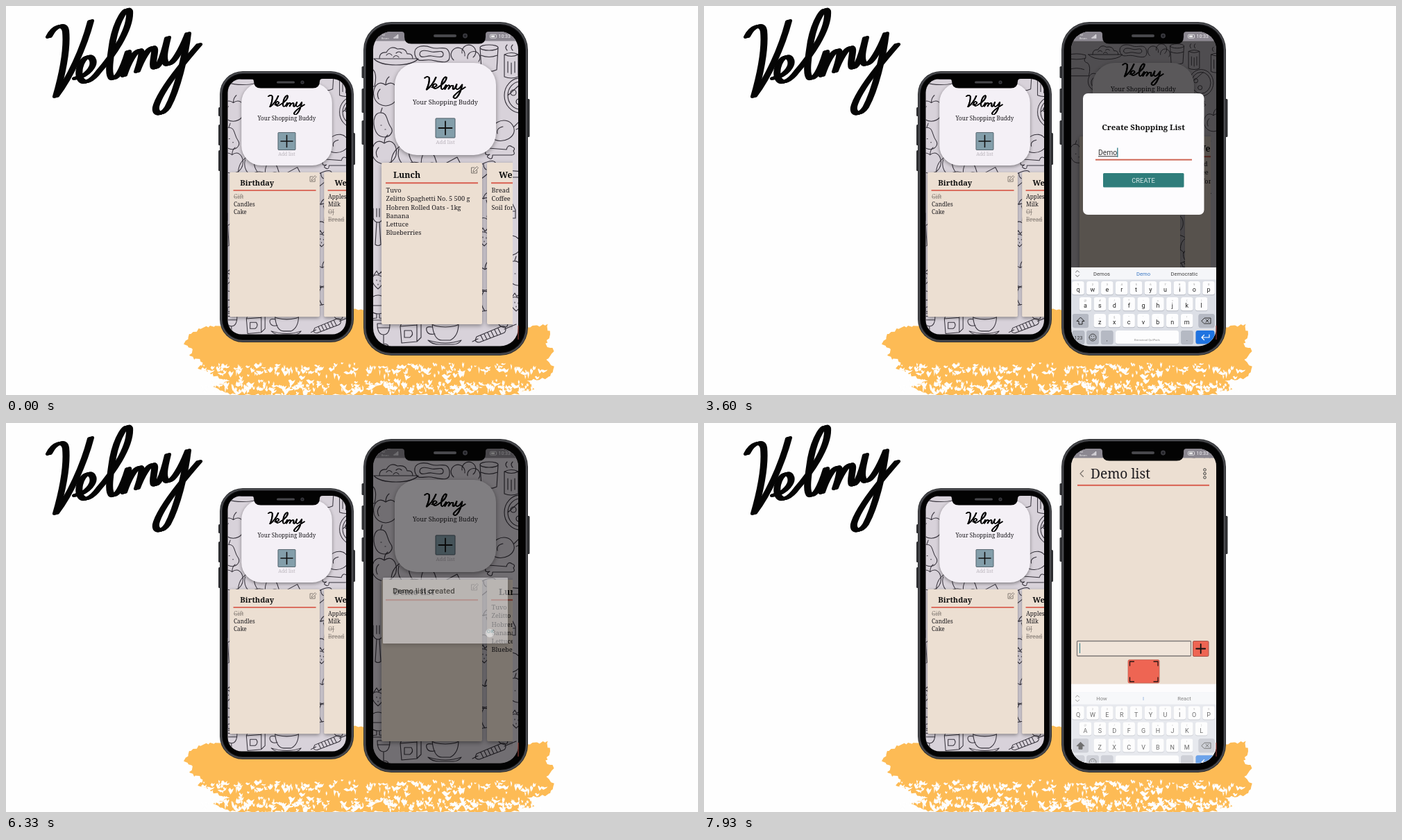
An HTML page that plays this animation: 997x561 px, repeating every 8000 ms.

```html
<!DOCTYPE html>
<html lang="en">
<head>
<meta charset="utf-8">
<title>Velmy</title>
<style>
html, body { margin: 0; width: 100%; height: 100%; overflow: hidden; background: #fefefe; }
svg { display: block; width: 100%; height: 100%; }
text { white-space: pre; }
.serif { font-family: "Noto Serif", serif; }
.sans { font-family: Roboto, sans-serif; }
.mid { text-anchor: middle; }
.line { fill: none; stroke-linecap: round; stroke-linejoin: round; }
.lift { filter: drop-shadow(0 2px 3px rgba(0,0,0,.4)); }
</style>
</head>
<body>
<svg id="stage" viewBox="0 0 997 561" preserveAspectRatio="none"></svg>
<script>
const CREAM = '#ecdfd2', RED = '#d95f50', INK = '#1c1a1e', LOOP = 8000;
const $ = id => document.getElementById(id);

let seed = 11;
const rnd = () => (seed = seed * 16807 % 2147483647) / 2147483647;

const rect = (x, y, w, h, fill, r = 0, more = '') =>
  `<rect x="${x}" y="${y}" width="${w}" height="${h}" rx="${r}" fill="${fill}" ${more}/>`;
const text = (x, y, size, str, cls = 'serif', fill = INK, more = '') =>
  `<text x="${x}" y="${y}" font-size="${size}" class="${cls}" fill="${fill}" ${more}>${str}</text>`;
const line = (d, stroke, w = 1, more = '') =>
  `<path class="line" d="${d}" stroke="${stroke}" stroke-width="${w}" ${more}/>`;
const group = (id, inner, more = '') => `<g id="${id}" ${more}>${inner}</g>`;

// Script wordmark, drawn with a slanted nib
const WORD = 'M62 44C70 28 84 24 86 36C89 66 80 102 72 130C92 104 112 60 122 22' +
  'M100 104C116 102 130 86 124 76C116 66 102 86 106 102C110 116 124 108 134 94' +
  'C150 76 180 36 178 8C174 -2 160 20 154 50C150 76 146 100 153 104C160 106 168 92 176 66' +
  'C178 76 174 88 170 100C176 82 186 64 193 64C198 66 193 82 189 94C195 78 205 60 212 60' +
  'C218 62 209 82 213 88C218 92 225 80 233 46C229 62 224 82 233 84C242 84 255 58 262 40' +
  'C258 74 247 120 233 146C224 160 212 156 217 142C224 122 250 88 278 56';
const wordmark = (w, spread) => [-2, -1, 0, 1, 2].map(i =>
  line(WORD, '#050505', w, `transform="translate(${i * spread} ${-i * spread * .25})"`)).join('');

const DOODLES = {
  plate: 'M-32 4H32Q24 13 0 13T-32 4M-24 4Q-24-6-14-5Q-8-16 2-10Q14-12 16-3Q24-4 24 4M-14-1q4-5 8 0M0-4q4-4 8 0M-4 2q4-5 8 0',
  steak: 'M-24 0C-26-14-10-14 0-10S24-16 26 0S12 10 0 8S-20 14-24 0M-17 0c0-8 10-6 17-4s16-4 17 3s-10 4-17 3s-15 5-17-2',
  eggs: 'M-18 8a10 10 0 1 1 16-6M-6-2a10 10 0 1 1 16 6M2 6a9 9 0 1 1 16 4',
  glass: 'M-13-14l2 32q11 5 22 0l2-32M-13-14a13 4 0 1 0 26 0a13 4 0 1 0-26 0M-12-3q12 5 24 0',
  mug: 'M-10-8q10 5 20 0v32q-10 4-20 0zM-10-8q10-5 20 0M-6-14q-4-4 0-8M2-14q-4-4 0-8M-5 2v16M0 4v16M5 2v16',
  pizza: 'M-23 0a23 25 0 1 0 46 0a23 25 0 1 0-46 0M-18 0a18 20 0 1 0 36 0a18 20 0 1 0-36 0M-14-4a4 4 0 1 0 8 0a4 4 0 1 0-8 0M-6 9a4 4 0 1 0 8 0a4 4 0 1 0-8 0M-18 0L4-20',
  apple: 'M0-10C-18-24-28 18 0 20C28 18 18-24 0-10q0-8 5-12M-8-4q-6 6-2 14',
  pear: 'M-4-16C8-18 6-4 12 4s-2 18-14 14S-16-14-4-16M-2-17l2-6M-2 2h1M4 8h1',
  leg: 'M-18 10C-26-10 2-24 12-8S-4 22-18 10M14-6l10-10q8-4 4 4q8 2-2 6l-9 4M-10 4q-2-8 8-10',
  bone: 'M-12 4q-8 2-6-4q-4-6 4-5L12-3q2-8 8-4q6 2 2 6q4 6-4 6L-8 5q0 8-6 4q-4-2 2-5z',
  roll: 'M-30 6C-36-18-10-36 10-26C30-22 40 0 32 22C24 26 16 20 18 6C8-4-6-2-10 6C-18 14-26 14-30 6zM-10 6Q-24-4-20-20M0 0Q-10-14-2-28M12 2Q12-14 22-20M18 8Q24-4 34 2',
  melon: 'M-20-12Q-2-17 20-13Q22 10 4 17T-20-12zM-16-8Q0-12 16-9Q16 8 3 12T-16-8M-8-3v3M0-4v3M8-3v3M-3 3v3M5 3v3',
  sundae: 'M-31 4Q-20 0-10 3T12 3T31 3Q26 28 0 28T-31 4M-24 0C-28-16-10-18-8-6C-2-24 20-14 22 1M-8-6q-2 10 3 9q4-1 4-7q5 12 9 3q3-8 8-2M-6-16q-10-6-2-11q0-10 9-10q10 0 8 9q10 4 2 11q-8 4-17 1M0-36l4-5M-20 14Q0 22 20 14',
  bread: 'M-22 18Q-32 10 4-14Q24-24 24-12Q-2 16-22 18M-10 10q-4-2-4-8M0 3q-4-3-4-8M10-6q-4-2-4-8',
  cheese: 'M-16 4L10-10L16 2V14H-16zM-16 4H16M-6 9a3 3 0 1 0 1 0M7 8a2 2 0 1 0 1 0',
  egg: 'M-12 0C-14-20 14-20 12 0zM-13 0q2 12 13 12t13-12zM-2 12v6q-6 0-8 3h20q-2-3-8-3v-6',
  jar: 'M-17-13q17-5 34 0v6q-17 4-34 0zM-15-6q2 6-6 8q-6 6-2 24h46q4-18-2-24q-8-2-6-8M-14 14q14-5 28 0',
  pepper: 'M0-10C-16-18-16 12-6 20Q0 15 6 20C17 14 15-18 0-10q0-6 6-9M-3-8q-5 12-1 24M4-8q5 12 1 24',
  fork: 'M-2 26L0-6h4l2 32q-4 3-8 0M-5-26v14q2 6 7 6t7-6v-14M0-26v12M4-26v12',
  cup: 'M-18-10a19 5 0 1 0 38 0a19 5 0 1 0-38 0M-18-10Q-16 14-4 14H8Q20 8 20-10M-18-5q-10-2-8 5t12 5M-24 14q26 8 48 0q-4 6-12 6h-20q-10 0-16-6M-6-10q6-4 14 0',
  carton: 'M-14-6l2 24l22-2v-24zM-14-6l4-9l20-1v8M10 16l6-6v-20l-6-6M-8 0h10q4 6-2 10h-8z',
  skewer: 'M-30 13L-22 9M16-5L33-12M-24 6l36-15q6-1 6 4t-4 6l-34 13q-5 0-6-3zM-18 4l4 8M-13 2l4 8M-8 0l4 8M-3-2l4 8M2-4l4 8M7-6l4 8',
  wine: 'M-9-10q0 16 9 16t9-16zM0 6v14m-7 2h14q-2-3-7-3M-9-4h18',
  berry: 'M0 12C-14 0-8-10 0-8S14 0 0 12M-6-8l4-6l3 5l4-4l1 6M-2-1v1M3 0v1M0 5v1'
};
const SPOTS = 'plate 562 72,steak 613 70,eggs 663 70,glass 696 74,mug 728 78,pizza 741 129,apple 547 124,' +
  'pear 542 170,apple 545 208,leg 718 180,bone 709 210,roll 586 226,bread 682 242,melon 574 277,sundae 633 286,' +
  'cheese 718 292,egg 575 322,jar 627 333,pepper 664 324,fork 534 318,berry 689 334,berry 536 396,pear 735 384,' +
  'apple 690 390,leg 728 346,wine 544 468,carton 582 468,cup 632 468,skewer 702 471,berry 735 428,egg 536 432,' +
  'bone 735 242,jar 508 90,mug 770 84,apple 764 200,pear 508 260,cheese 640 228,pepper 688 288,roll 690 440';
const pattern = SPOTS.split(',').map(s => {
  const [name, x, y] = s.split(' ');
  return line(DOODLES[name], '#37333c', 1.15, `transform="translate(${x} ${y})"`);
}).join('');

const plus = (cx, cy, r) => line(`M${cx - r} ${cy}H${cx + r}M${cx} ${cy - r}V${cy + r}`, '#111', 1.8);

function card(x, title, items) {
  const rows = items.map((s, i) => {
    const done = s[0] === '-';
    return text(x + 6.5, 269 + i * 12.25, 9.2, done ? s.slice(1) : s, 'serif',
      done ? '#8f867f' : INK, done ? 'text-decoration="line-through"' : '');
  }).join('');
  return rect(x, 226, 145, 233, CREAM, 2, 'class="lift"') +
    text(x + 17, 248, 12.3, title, 'serif', '#111', 'font-weight="700"') +
    line(`M${x + 6} 255.3H${x + 139}`, RED, 2, 'style="stroke-linecap:butt"') +
    line(`M${x + 134} 233h-4.5v8h8v-4M${x + 132} 239l.5-2.5l5-5l2 2l-5 5z`, '#6f6862', .9) + rows;
}

const home = (id, lists) =>
  rect(500, 30, 270, 470, '#d8d2da') + group(id + 'Bg', pattern) +
  `<rect id="${id}Panel" class="lift" x="560" y="82" width="146" height="133" rx="32" fill="#f4f0f6"/>` +
  group(id + 'Title',
    `<g transform="matrix(.27 .05 0 .19 586.5 92.5)" aria-label="Velmy">${wordmark(5, .9)}</g>` +
    text(633, 142, 9.1, 'Your Shopping Buddy', 'serif mid') +
    group(id + 'Add', rect(619, 162, 28, 28, '#839eaa', 1, 'stroke="#4d5d66" stroke-width="1"') + plus(633, 176, 9.5)) +
    text(633, 199, 7.6, 'Add list', 'serif mid', '#bab4bc')) +
  `<g clip-path="url(#listClip)">${group(id + 'Lists', lists)}</g>`;

const LUNCH = ['Tuvo', 'Zelitto Spaghetti No. 5 500 g', 'Hobren Rolled Oats - 1kg', 'Banana', 'Lettuce', 'Blueberries'];
const leftHome = home('l', card(541, 'Birthday', ['-Gift', 'Candles', 'Cake']) +
  card(693, 'Weekly', ['Apples', 'Milk', '-OJ', '-Bread']));
const rightHome = home('r',
  group('listsA', card(541, 'Lunch', LUNCH) + card(693, 'Weekly', ['Bread', 'Coffee', 'Soil for pots'])) +
  group('listsB', group('demo', card(541, 'Demo list', [])) + card(693, 'Lunch', LUNCH)));

// Keyboard
const ROWS = [['qwertyuiop', 539, 407], ['asdfghjkl', 549.5, 430], ['zxcvbnm', 570.3, 454]];
const HINTS = ['1234567890', '@#/*-+=()', '_$"\':;!'];
const STEP = 20.9;
const keySpot = ch => {
  if (ch === ' ') return [640, 478];
  const [s, x, y] = ROWS.find(r => r[0].includes(ch));
  return [x + s.indexOf(ch) * STEP, y];
};
const keyRect = (cx, cy, w, fill) => rect(cx - w / 2, cy - 9.7, w, 20, '#b4b8c1', 3) + rect(cx - w / 2, cy - 10, w, 19.3, fill, 3);

function keyboard() {
  let s = rect(529, 377, 209, 125, '#dcdfe6') + rect(529, 377, 209, 17.5, '#f5f6f9') +
    line('M535.5 384l2.5-2.5l2.5 2.5M535.5 388l2.5 2.5l2.5-2.5', '#666', 1);
  [573, 633, 692].forEach((x, i) => s += text(x, 388.5, 7.6, '', 'sans mid', i === 1 ? '#3b78c4' : '#444', `id="hint${i}"`));
  ROWS.forEach(([letters, , y], row) => [...letters].forEach((ch, i) => {
    const [x] = keySpot(ch);
    s += keyRect(x, y, 17.5, '#fdfdfe') + text(x, y - 4, 4.3, HINTS[row][i], 'sans mid', '#999') +
      text(x, y + 5.3, 9, ch, 'sans mid key', '#222');
  }));
  const dark = '#b5b9c3';
  return s + keyRect(542.5, 454, 23, dark) + keyRect(724, 454, 23, dark) +
    `<path id="shift" d="M542.5 449l5.5 5.5h-3v4.5h-5v-4.5h-3z" stroke="#222" stroke-linejoin="round"/>` +
    line('M717 454l4-4h9v8h-9zM723 452l4 4M727 452l-4 4', '#333', 1) +
    keyRect(539.5, 478, 17.5, dark) + text(539.5, 481, 7, '123', 'sans mid', '#333') +
    keyRect(560, 478, 17.5, dark) + line('M555 478a5 5 0 1 0 10 0a5 5 0 1 0-10 0M557.5 479.5q2.5 3 5 0M558.3 476v.5M561.7 476v.5', '#333', .9) +
    keyRect(580.7, 478, 17.5, dark) + text(580.7, 483, 7, ',', 'sans mid', '#333') +
    keyRect(638.5, 478, 91, '#fdfdfe') + text(638.5, 482.5, 4.2, 'Brimstead QuilPads', 'sans mid', '#888') +
    keyRect(696, 478, 17.5, dark) + text(696, 483, 7, '.', 'sans mid', '#333') +
    keyRect(722, 478, 27, '#1f73e0') + line('M728 474v4h-11m3.5-3.5l-3.5 3.5l3.5 3.5', '#fff', 1.2) +
    group('pop', rect(-11, -33, 22, 43, '#fcfcfe', 4, 'class="lift"') + text(0, -16, 11, '', 'sans mid', '#3b6fa5', 'id="popKey"'));
}

const dialog = rect(546, 126, 174.5, 175, '#fdfcfe', 7) +
  text(633, 179, 11.4, 'Create Shopping List', 'serif mid', '#111', 'font-weight="700"') +
  text(568, 215.3, 10.3, 'Insert list name...', 'sans', '#a5a3a6', 'id="blank"') +
  `<text id="typed" class="sans" x="568" y="215.3" font-size="10.3" fill="#333"><tspan id="done"></tspan><tspan id="word" text-decoration="underline"></tspan></text>` +
  rect(568, 204.5, 1.3, 13.5, '#2c7a86', 0, 'id="caret"') + rect(564, 220.7, 139, 2, '#cf6857') +
  group('create', rect(575, 241, 116.5, 20.5, '#2f7d7b', 1.5) + text(633, 254.7, 9.3, 'CREATE', 'sans mid', '#dcebea'));

const alertBox = rect(543, 223, 180, 95, '#fcfafc', 1, 'class="lift"') +
  text(557, 246, 11.4, 'Demo list created', 'sans', '#222', 'font-weight="500"') +
  text(698, 303, 7.8, 'OK', 'sans mid', '#1c6f7d', 'font-weight="700"');

const page = rect(529, 30, 209, 500, CREAM) +
  line('M546.5 68.5l-4.5 4.5l4.5 4.5', '#77706a', 1.1) + text(557, 80, 19.2, 'Demo list') +
  [67.5, 73, 78.5].map(y => `<circle cx="721.5" cy="${y}" r="1.8" fill="none" stroke="#333"/>`).join('') +
  rect(538, 88.8, 190, 2, RED) +
  group('entry', rect(537.5, 314.5, 164, 21.5, '#f0e4d9', 1, 'stroke="#7f7a78" stroke-width="1.3"') +
    rect(541, 317.5, 1, 14.5, '#2c7a86', 0, 'id="entryCaret"') +
    rect(704.5, 314.5, 22.5, 22, '#ee6553', 1.5, 'stroke="#a5544a" stroke-width="1"') + plus(715.7, 325.5, 6.5) +
    rect(611, 341.5, 45, 33.5, '#ee6553', 2, 'stroke="#c06055" stroke-width=".8"') +
    line('M613.5 350v-6h6M648 344h6v6M654 367v6h-6M619.5 373h-6v-6', '#2a1715', 1.3)) +
  rect(529, 376.5, 209, 130, '#fdfcfd', 0, 'id="under"');

const status = rect(529, 30, 209, 20.5, '#8b8790') + text(541, 43, 3.8, 'Tel', 'sans', '#eee') +
  text(541, 47.8, 3.8, 'Bovan', 'sans', '#eee') +
  [0, 1, 2, 3].map(i => rect(558.5 + i * 1.8, 45.2 - i * 1.4, 1.2, 1.6 + i * 1.4, '#f2f0f4')).join('') +
  rect(697.5, 41.2, 9, 5, 'none', 1, 'stroke="#eee" stroke-width=".8"') + rect(699, 42.5, 5, 2.4, '#eee') +
  text(709.5, 46.4, 7, '10:33', 'sans', '#f4f2f5');

// Orange paint: a solid stroke, then dry bristles below it
function paint() {
  const top = [[258, 488], [264, 474], [285, 463], [325, 460], [380, 450], [500, 437], [535, 441], [700, 452], [752, 462], [780, 460], [784, 474], [777, 488], [790, 496], [780, 510], [790, 524], [781, 536], [752, 541]];
  const low = [[760, 552], [736, 561], [318, 561], [298, 548], [322, 540], [300, 534], [276, 521], [284, 514], [264, 505], [270, 497]];
  const pts = [];
  [...top, ...low].forEach((p, i, all) => {
    const q = all[(i + 1) % all.length], n = Math.ceil(Math.hypot(q[0] - p[0], q[1] - p[1]) / 4);
    for (let k = 0; k < n; k++)
      pts.push([p[0] + (q[0] - p[0]) * k / n + rnd() * 4 - 2, p[1] + (q[1] - p[1]) * k / n + rnd() * 4 - 2].map(v => v.toFixed(1)));
  });
  let flecks = '';
  for (let i = 0; i < 520; i++) {
    const lane = i % 5 < 2 ? 524 : 549, x = 280 + rnd() * 490;
    const y = lane + (rnd() + rnd() - 1) * 11, w = 2 + rnd() * rnd() * 13, h = 1.5 + rnd() * 4;
    if (y < 515) continue;
    flecks += `M${x} ${y}l${w * .3} ${-h * rnd()}l${w * .3} ${h * .6}l${w * .4} ${-h * .5}l${-w * .2} ${h}l${-w * .4} ${h * rnd()}z`;
  }
  return `<path d="M${pts.join('L')}z" fill="#fdbb55"/><path d="${flecks}" fill="#fefefe"/>`;
}

function phone(x, y, w, h, r, sides) {
  const ring = (inset, fill) => rect(x + inset, y + inset, w - 2 * inset, h - 2 * inset, fill, r - inset);
  return sides.map(([sx, sy, sh]) => rect(sx, sy, 4, sh, '#2f3033', 1.5)).join('') +
    ring(0, '#2b2c2f') + ring(1, '#4b4c50') + ring(3, '#1c1c1f') + ring(4, '#030303');
}
const notch = (x, y, w, h) =>
  `<path d="M${x - 4} ${y - 2}h${w + 8}v2q-4 0-4 4v${h - 14}q0 10-10 10h${20 - w}q-10 0-10-10v${14 - h}q0-4-4-4z" fill="#030303"/>`;
const camera = (cx, cy, r) => `<circle cx="${cx}" cy="${cy}" r="${r}" fill="#3b3b40"/><circle cx="${cx}" cy="${cy}" r="${r * .5}" fill="#202026"/>`;

$('stage').innerHTML = `<defs>
  <clipPath id="leftClip">${rect(319.5, 105, 170.5, 368.5, '#000', 20)}</clipPath>
  <clipPath id="rightClip">${rect(529, 37, 209, 453.5, '#000', 26)}</clipPath>
  <clipPath id="listClip">${rect(520, 20, 210, 500, '#000')}</clipPath>
  <clipPath id="reveal"><rect id="revealBox" x="529" width="209" height="500"/></clipPath></defs>` +
  rect(0, 0, 997, 561, '#fefefe') +
  `<g aria-label="Velmy">${wordmark(4.5, 1.4)}</g>` + paint() +
  phone(308, 94, 193, 391, 33, [[306, 146, 13], [306, 171, 30], [306, 208, 30], [499, 183, 46]]) +
  `<g clip-path="url(#leftClip)"><g transform="translate(404.5 195) scale(.895) translate(-633 -176)">${leftHome}</g></g>` +
  notch(357, 105, 95, 13.5) + rect(390, 108.5, 26, 3, '#48484c', 1.5) + camera(427, 110, 2.6) +
  phone(515, 23, 237, 481, 40, [[512.5, 87, 17], [512.5, 119, 35], [512.5, 165, 35], [750.5, 134, 55]]) +
  `<g clip-path="url(#rightClip)">` + group('home', rightHome) + rect(529, 30, 209, 470, '#000', 0, 'id="shade"') + status +
  group('modal', rect(529, 50.5, 209, 450, '#000', 0, 'opacity=".63"') + group('dialog', dialog)) +
  `<g clip-path="url(#reveal)">${group('page', page)}</g>` + group('keys', keyboard()) +
  rect(529, 30, 209, 470, '#000', 0, 'id="dim"') + group('alert', alertBox) +
  '<circle id="touch" r="6" fill="#fff" fill-opacity=".5" stroke="#ccc" stroke-width=".5"/></g>' +
  rect(737.5, 461, 1, 20, '#a8443c') +
  notch(574, 37, 117, 17.5) + rect(616, 41, 33, 4, '#48484c', 2) + camera(661.5, 43, 3.4);

const keyTexts = [...document.querySelectorAll('.key')];
const PHRASE = 'Demo list';
const KEY_TIMES = [2570, 2830, 3120, 3390, 3690, 3990, 4250, 4510, 4780];
const TAPS = [[70, 190, 633, 176], [5080, 5230, 633, 251], [6200, 6400, 697, 303], [6790, 7040, 652, 374]];

const ramp = (t, a, b) => Math.min(1, Math.max(0, (t - a) / (b - a)));
const easeOut = (p, n = 2) => 1 - (1 - p) ** n;
const set = (id, name, value) => $(id).setAttribute(name, value);
const show = (id, on) => set(id, 'opacity', Number(on));
const move = (id, x, y) => set(id, 'transform', `translate(${x} ${y})`);

function suggestions(str) {
  if (!str) return ['How', 'I', 'React'];
  if (str.endsWith(' ')) return ['is', 'and', 'for'];
  return str.includes(' ') ? ['lists', 'list', 'listed'] : ['Demos', 'Demo', 'Democratic'];
}

function drawKeys(t, str) {
  const e = t < 5450 ? easeOut(ramp(t, 500, 860)) : t < 7000 ? 1 - ramp(t, 5450, 5750) : easeOut(ramp(t, 7700, 8160));
  show('keys', e ** 1.5);
  move('keys', 0, 45 * (1 - e));
  const upper = !str;
  keyTexts.forEach(k => {
    const ch = upper ? k.textContent.toUpperCase() : k.textContent.toLowerCase();
    if (k.textContent !== ch) k.textContent = ch;
  });
  set('shift', 'fill', upper ? '#222' : 'none');
  suggestions(str).forEach((s, i) => $('hint' + i).textContent = s);
}

function drawTouch(t) {
  let spot = null, popped = false;
  for (const [a, b, x, y] of TAPS) if (t >= a && t < b) spot = [x, y];
  const i = KEY_TIMES.findIndex(k => t >= k - 85 && t < k + 50);
  if (i >= 0) {
    const ch = PHRASE[i], [x, y] = keySpot(ch.toLowerCase());
    spot = [x + 7, y + 2];
    popped = ch !== ' ';
    move('pop', x, y);
    $('popKey').textContent = ch;
  }
  show('pop', popped);
  show('touch', !!spot);
  if (spot) move('touch', ...spot);
}

function draw(t) {
  const str = t < 7000 ? PHRASE.slice(0, KEY_TIMES.filter(k => t >= k).length) : '';
  const cut = str.lastIndexOf(' ') + 1;
  $('done').textContent = str.slice(0, cut);
  $('word').textContent = str.slice(cut);
  show('blank', !str);
  set('caret', 'x', 568 + (str ? $('typed').getComputedTextLength() : 0));
  show('caret', !!str || Math.floor((t - 600) / 535) % 2 !== 0);

  const squeezed = t >= 530 && t < 5400;
  move('rTitle', 0, squeezed ? -19 : 0);
  move('rLists', 0, squeezed ? -38 : 0);
  set('rPanel', 'height', squeezed ? 100 : 133);
  set('rBg', 'transform', squeezed ? 'translate(633 50) scale(.77) translate(-633 -50)' : '');
  show('rAdd', t >= 70 && t < 260 ? .4 : 1);
  show('listsA', t < 5400);
  show('listsB', t >= 5400);
  show('demo', 1 - .75 * ramp(t, 6790, 6930));

  show('modal', ramp(t, 190, 400) * (1 - ramp(t, 5330, 5480)));
  move('dialog', 0, t < 530 ? 57 : 0);
  show('create', t >= 5080 && t < 5260 ? .5 : 1);

  const closing = t >= 6330;
  show('alert', closing ? .48 * (1 - ramp(t, 6330, 6500)) : ramp(t, 5480, 5610));
  show('dim', closing ? .48 * (1 - ramp(t, 6330, 6530)) : .6 * ramp(t, 5460, 5760));

  // New page rises behind an edge that opens from the bottom, while home darkens
  const p = ramp(t, 6930, 7330), rise = easeOut(p, 3);
  move('home', 0, -7 * rise);
  show('shade', .24 * rise);
  move('page', 0, 18.6 * (1 - rise));
  set('revealBox', 'y', Math.max(50.5, 490.5 - 453.5 * easeOut(p)));
  const resized = t >= 7730;
  move('entry', 0, resized ? 0 : 114);
  show('under', resized);
  show('entryCaret', resized);

  drawKeys(t, str);
  drawTouch(t);
}

function tick() {
  const step = Math.floor((performance.now() % LOOP + 4) / (1000 / 15)) % 120;
  draw(Math.round(step * 100 / 15) * 10);
  requestAnimationFrame(tick);
}
tick();
</script>
</body>
</html>
```
